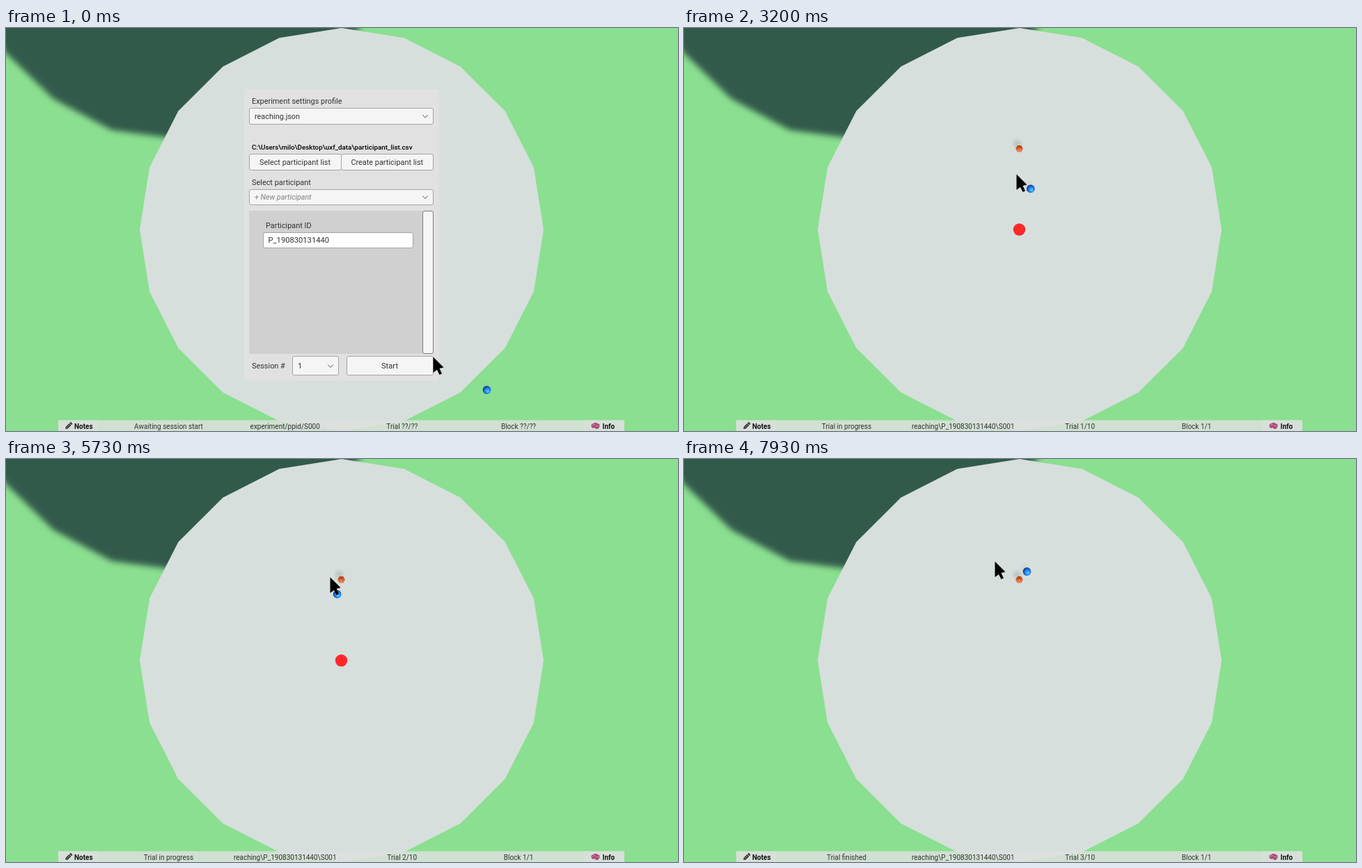
Write an HTML page with a canvas that moves like this. It is 965x580 px and loops after 8000 ms.

```html
<!DOCTYPE html>
<html lang="en">
<head>
<meta charset="utf-8">
<title>Reaching task</title>
<style>
html, body { margin: 0; width: 100%; height: 100%; overflow: hidden; background: #8bdf90; }
canvas { display: block; }
</style>
</head>
<body>
<canvas id="stage" width="965" height="580"></canvas>
<script>
const W = 965, H = 580, LOOP = 8000, STEP = 200 / 3, TAU = Math.PI * 2;
const HOME = { x: 481.5, y: 290 };
const INK = '#303230', RED = '#ff2829', AMBER = '#ffb020', GREEN = '#22dc28';
const PRESS = 14, SESSION = 16, WAIT = 7;
const canvas = document.getElementById('stage');
let ctx = canvas.getContext('2d');

// All times below are in steps of 1/15 s
const TRIALS = [
  { go: 39, leave: 43, end: 51 },
  { go: 74, leave: 82, end: 88 },
  { go: 105, leave: 115, end: 116 }
];

// Turning points of the pointer: step, x, y
const KEYS = [
  [-1, 682, 513], [0, 613, 472], [4, 595, 457], [8, 554, 470], [10, 571, 471],
  [21, 571, 471], [28, 480, 305], [33, 474, 282], [39, 474, 282], [46, 501, 235],
  [48, 477, 209], [51, 475, 159], [58, 514, 185], [67, 476, 280], [78, 475, 282],
  [90, 455, 129], [93, 427, 150], [96, 456, 257], [104, 476, 283], [113, 474, 270],
  [118, 484, 154], [119, 446, 146]
];

const slope = (i, a) => (KEYS[i + 1][a] - KEYS[i][a]) / (KEYS[i + 1][0] - KEYS[i][0]);

// Tangent that vanishes at turning points, so the curve never overshoots
function tangent(i, a) {
  if (i === 0) return slope(0, a);
  if (i === KEYS.length - 1) return slope(i - 1, a);
  const p = slope(i - 1, a), q = slope(i, a);
  return p * q > 0 ? 2 * p * q / (p + q) : 0;
}

function pointer(k) {
  const i = Math.max(0, KEYS.findIndex(p => p[0] >= k) - 1);
  const span = KEYS[i + 1][0] - KEYS[i][0];
  const f = (k - KEYS[i][0]) / span, g = 1 - f;
  const [x, y] = [1, 2].map(a =>
    KEYS[i][a] * g * g * (1 + 2 * f) + KEYS[i + 1][a] * f * f * (3 - 2 * f) +
    span * f * g * (tangent(i, a) * g - tangent(i + 1, a) * f));
  return { x, y };
}

function discColor(k) {
  if (k < SESSION) return null;
  const trial = TRIALS.filter(t => k >= t.go - WAIT).pop();
  if (!trial) return RED;
  if (k < trial.go) return AMBER;
  if (k < trial.leave) return GREEN;
  return k >= trial.end && k < trial.end + WAIT ? null : RED;
}

function labels(k) {
  const n = TRIALS.filter(t => k >= t.go).length;
  const idle = k < SESSION ? 'Awaiting session start' : 'Awaiting trial start';
  return {
    state: !n ? idle : k < TRIALS[n - 1].end ? 'Trial in progress' : 'Trial finished',
    folder: k < SESSION ? 'experiment/ppid/S000' : 'reaching\\P_190830131440\\S001',
    trial: 'Trial ' + (n ? n + '/10' : '??/??'),
    block: 'Block ' + (n ? '1/1' : '??/??')
  };
}

function poly(points, fill) {
  ctx.beginPath();
  points.forEach(([x, y]) => ctx.lineTo(x, y));
  ctx.closePath();
  ctx.fillStyle = fill;
  ctx.fill();
}

function ring(x, y, r, n, turn = 0) {
  return Array.from({ length: n }, (_, i) => {
    const a = turn + i * TAU / n;
    return [x + r * Math.sin(a), y - r * Math.cos(a)];
  });
}

function disc(x, y, r, fill) {
  ctx.beginPath();
  ctx.arc(x, y, r, 0, TAU);
  ctx.fillStyle = fill;
  ctx.fill();
}

function rect(x, y, w, h, fill) {
  ctx.fillStyle = fill;
  ctx.fillRect(x, y, w, h);
}

function box(x, y, w, h, fill = '#f5f5f5', stroke = '#a2a4a2') {
  ctx.beginPath();
  ctx.roundRect(x + 0.5, y + 0.5, w - 1, h - 1, 2.5);
  ctx.fillStyle = fill;
  ctx.fill();
  ctx.strokeStyle = stroke;
  ctx.lineWidth = 1;
  ctx.stroke();
}

function text(str, x, mid, { size = 10.9, style = '', color = INK, align = 'left' } = {}) {
  ctx.font = `${style} ${size}px Roboto, sans-serif`;
  ctx.textAlign = align;
  ctx.fillStyle = color;
  ctx.fillText(str, x, Math.round(mid + size * 0.36));
}

function chevron(x, y) {
  ctx.beginPath();
  ctx.moveTo(x - 3.8, y - 2);
  ctx.lineTo(x, y + 2);
  ctx.lineTo(x + 3.8, y - 2);
  ctx.strokeStyle = '#505250';
  ctx.lineWidth = 1;
  ctx.stroke();
}

function softSpot(x, y, r, alpha) {
  const g = ctx.createRadialGradient(x, y, 0, x, y, r);
  g.addColorStop(0, `rgba(70,95,90,${alpha})`);
  g.addColorStop(1, 'rgba(70,95,90,0)');
  disc(x, y, r, g);
}

function drawScene() {
  rect(0, 0, W, H, '#8bdf90');
  ctx.filter = 'blur(4px)';
  poly([[-30, -30], [520, -30], [508, 0], [330, 138], [235, 158],
    [152, 147], [68, 102], [0, 36], [-30, -5]], '#325a4b');
  ctx.filter = 'none';
  poly(ring(482, 290, 290, 20), '#d6dfdc');
}

function drawTarget() {
  const x = 481.5, y = 173.7;
  softSpot(x - 3, y - 7, 9, 0.22);
  const rim = ring(x, y, 5.4, 6, TAU / 12);
  // Facets grow darker toward the top
  rim.forEach((p, i) => {
    const q = rim[(i + 1) % 6];
    const lit = (p[1] + q[1]) / 2 - y;
    poly([[x, y], p, q], `hsl(16 82% ${51 + lit * 2.6}%)`);
  });
}

function drawBall({ x, y }) {
  softSpot(x - 3, y - 7, 8, 0.06);
  const g = ctx.createRadialGradient(x + 1.5, y + 2, 0.3, x + 1, y + 1, 7.3);
  g.addColorStop(0, '#62c4ff');
  g.addColorStop(0.5, '#2181ee');
  g.addColorStop(1, '#0f3180');
  disc(x, y, 5.9, g);
}

function drawPanel(press) {
  rect(342, 88, 280, 419.5, '#e1e1e1');
  text('Experiment settings profile', 353, 105);
  box(349, 115, 265, 24);
  text('reaching.json', 357, 127);
  chevron(602, 127);

  text('C:\\Users\\milo\\Desktop\\uxf_data\\participant_list.csv', 353, 171.5,
    { size: 9.8, style: '500', color: '#000' });
  box(349, 181, 133, 24);
  box(481, 181, 133, 24);
  text('Select participant list', 415, 193, { align: 'center' });
  text('Create participant list', 547.3, 193, { align: 'center' });

  text('Select participant', 353, 222);
  box(349, 232, 265, 23);
  text('+ New participant', 357, 243.5, { size: 10.7, style: 'italic', color: '#808080' });
  chevron(602, 243.5);

  rect(349, 263, 250, 206, '#d0d0d0');
  box(598, 263, 16, 206, '#f5f5f5', '#7c7e7c');
  text('Participant ID', 373, 284);
  box(369, 294, 216, 23, '#fff');
  text('P_190830131440', 376.5, 305, { size: 11.2 });

  text('Session #', 353, 486);
  box(411, 472, 67, 28);
  text('1', 419, 486.5);
  chevron(466, 486.5);
  box(489, 472, 125, 28, `hsl(156 2% ${96 - 10 * press}%)`);
  text('Start', 551, 486, { size: 11.2, align: 'center' });
}

function drawPencil(x, y) {
  ctx.save();
  ctx.translate(x, y);
  ctx.rotate(-Math.PI / 4);
  poly([[-6.5, 0], [-4, -2], [3, -2], [3, 2], [-4, 2]], INK);
  rect(3.8, -2, 2.2, 4, INK);
  rect(-4, -0.5, 6, 0.8, '#9aa09b');
  ctx.restore();
}

function drawBrain(x, y) {
  for (let i = -1; i <= 1; i++) disc(x + 2.8 * i, y - 1.4 + 1.4 * i * i, 3.2, '#a84a78');
  disc(x + 2, y + 2, 2.6, '#a84a78');
  ctx.strokeStyle = '#e3a3c0';
  ctx.lineWidth = 0.8;
  ctx.beginPath();
  ctx.arc(x - 2, y, 2, 3, 6);
  ctx.moveTo(x, y + 1.5);
  ctx.quadraticCurveTo(x + 2, y - 2, x + 5, y + 0.5);
  ctx.stroke();
}

function drawBar(k) {
  const { state, folder, trial, block } = labels(k);
  const cell = { size: 10, align: 'center' }, bold = { size: 10, style: 'bold', color: '#111' };
  rect(75, 564.5, 813, 16, 'rgba(224,225,224,0.82)');
  rect(75, 564.5, 58, 16, 'rgba(224,225,224,0.5)');
  rect(829, 564.5, 59, 16, 'rgba(224,225,224,0.5)');
  text(state, 233.5, 573, cell);
  text(folder, 400.7, 573, cell);
  text(trial, 568.7, 573, cell);
  text(block, 736, 573, cell);
  drawPencil(90, 572.5);
  text('Notes', 98, 573, bold);
  drawBrain(846.5, 572.5);
  text('Info', 856.5, 573, bold);
}

function drawPointer({ x, y }) {
  const arrow = [[0, 0], [15, 15], [9, 16.5], [12.5, 24], [9, 25.5], [5.5, 18.5], [0, 22.5]];
  poly(arrow.map(([dx, dy]) => [x + 0.5 + dx, y + 1.5 + dy]), '#000');
}

const backdrop = document.createElement('canvas');
backdrop.width = W;
backdrop.height = H;
const screen = ctx;
ctx = backdrop.getContext('2d');
drawScene();
ctx = screen;

function draw(k) {
  const late = pointer(k - 1), color = discColor(k);
  ctx.drawImage(backdrop, 0, 0);
  if (color) disc(HOME.x, HOME.y, 8.7, color);
  if (k >= SESSION) drawTarget();
  // The ball trails the pointer by one step
  drawBall({ x: late.x + 8.5, y: late.y + 8 });
  if (k < SESSION) drawPanel(Math.max(0, k - PRESS + 1));
  drawBar(k);
  drawPointer(pointer(k));
}

function tick() {
  const t = performance.now() % LOOP;
  draw(Math.min(119, Math.floor((t + 5) / STEP)));
  requestAnimationFrame(tick);
}
tick();
</script>
</body>
</html>
```
